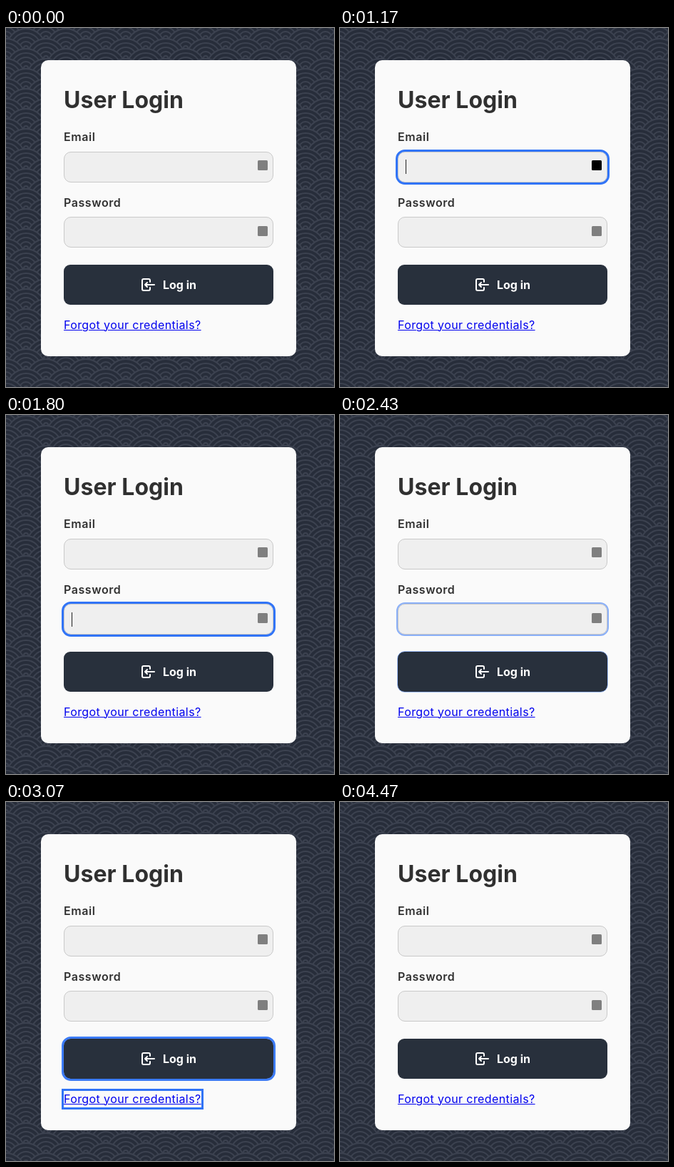
Write an HTML page that moves like this. It is 460 by 502 pixels and loops after 4.57 s.

```html
<!DOCTYPE html>
<html lang="en">
<head>
<meta charset="utf-8">
<title>User Login</title>
<style>
  html, body { margin: 0; width: 100%; height: 100%; overflow: hidden; background: #272d3a; }
  svg { display: block; width: 460px; height: 502px; }
  text, .link { font: 600 16px Inter, "Open Sans", sans-serif; fill: #303030; }
  .title { font-size: 32px; font-weight: 700; letter-spacing: .05px; }
  .label { letter-spacing: .55px; }
  .button { font-weight: 700; fill: #fff; }
  .link {
    position: absolute; left: 81px; top: 403px;
    font-weight: 400; line-height: 24px; letter-spacing: .4px; white-space: nowrap;
    color: #00e; text-decoration: underline 1px; text-underline-offset: 1px;
  }
  .wave { fill: #272d3a; stroke: #3c4250; stroke-width: 2; }
  .field { fill: #efefef; stroke: #c9c9c9; }
  .ring { fill: none; stroke: #3174f6; }
  .icon { fill: none; stroke: #fff; stroke-width: 2; stroke-linecap: round; stroke-linejoin: round; }
</style>
</head>
<body>
<svg viewBox="0 0 460 502">
  <defs>
    <pattern id="waves" width="56" height="28" patternUnits="userSpaceOnUse"></pattern>
  </defs>
  <rect width="460" height="502" fill="url(#waves)"/>
  <rect x="49" y="45" width="358" height="414" rx="10" fill="#fafafa"/>

  <text class="title" x="81" y="112">User Login</text>
  <text class="label" x="81" y="158">Email</text>
  <rect class="field" x="81.5" y="173.5" width="293" height="42" rx="9.5"/>
  <rect id="emailBadge" x="353" y="185" width="14" height="14" rx="1.5"/>
  <text class="label" x="81" y="250">Password</text>
  <rect class="field" x="81.5" y="264.5" width="293" height="42" rx="9.5"/>
  <rect x="353" y="277" width="14" height="14" rx="1.5" fill="#7f7f7f"/>
  <rect id="caret" x="92" width="1" height="20" fill="#222"/>

  <rect x="81" y="331" width="294" height="56" rx="9" fill="#28303c"/>
  <path class="icon" transform="translate(187 347)"
    d="M15 8v-2a2 2 0 0 0-2-2h-7a2 2 0 0 0-2 2v12a2 2 0 0 0 2 2h7a2 2 0 0 0 2-2v-2M21 12h-13l3-3m0 6l-3-3"/>
  <text class="button" x="220" y="365">Log in</text>
  <rect id="linkRing" class="ring" x="79.5" y="402.5" width="196" height="26" stroke-width="3"/>
</svg>
<span class="link">Forgot your credentials?</span>
<script>
const LOOP = 4570, FADE = 300, LEAD = 20, RING = 3;
const FOCUS = { email: 700, password: 1500, button: 2370, link: 3070, none: 4470 };
const HOLD = { from: 830, to: 1170 };
const byId = id => document.getElementById(id);

function setAll(el, attrs) {
  for (const key in attrs) el.setAttribute(key, attrs[key]);
}

function add(parent, name, attrs) {
  const el = document.createElementNS("http://www.w3.org/2000/svg", name);
  setAll(el, attrs);
  return parent.appendChild(el);
}

// Overlapping scales: each lower row covers the one above.
for (let row = -1; row < 4; row++) {
  for (let cx = row % 2 ? 0 : -28; cx <= 84; cx += 56) {
    for (const r of [27, 21, 15, 9, 3]) {
      add(byId("waves"), "circle", { class: "wave", cx, cy: row * 14, r });
    }
  }
}

// Same curve as the CSS "ease" keyword.
function ease(x) {
  const bezier = (a, b, s) => 3 * a * s * (1 - s) ** 2 + 3 * b * s * s * (1 - s) + s ** 3;
  let low = 0, high = 1;
  for (let i = 0; i < 20; i++) {
    const mid = (low + high) / 2;
    if (bezier(.25, .25, mid) < x) low = mid; else high = mid;
  }
  return bezier(.1, 1, low);
}

function progress(t, start) {
  return t < start ? 0 : ease(Math.min(1, (t - start + LEAD) / FADE));
}

const rings = [
  { y: 173, height: 43, start: FOCUS.email, end: FOCUS.password },
  { y: 264, height: 43, start: FOCUS.password, end: FOCUS.button },
  { y: 331, height: 56, start: FOCUS.button, end: FOCUS.link }
];
for (const ring of rings) {
  ring.el = add(document.querySelector("svg"), "rect", { class: "ring" });
}

function drawRing({ el, y, height, start, end }, t) {
  const leaving = t >= end;
  const amount = leaving ? 1 - progress(t, end) : progress(t, start);
  const width = leaving ? Math.ceil(RING * amount - .01) : Math.floor(RING * amount + .01);
  setAll(el, {
    x: 81 - width / 2, y: y - width / 2,
    width: 294 + width, height: height + width, rx: 10 + width / 2,
    "stroke-width": width, "stroke-opacity": width ? amount : 0
  });
}

function show(el, visible) {
  el.setAttribute("visibility", visible ? "visible" : "hidden");
}

function render(t) {
  const within = (from, to) => t >= from && t < to;
  // The first ring pauses part-way, then snaps to full width.
  const ringTime = within(HOLD.from, HOLD.to) ? HOLD.from : t;
  rings.forEach(ring => drawRing(ring, ringTime));

  byId("emailBadge").setAttribute("fill", within(HOLD.to, FOCUS.password) ? "#000" : "#7f7f7f");
  byId("caret").setAttribute("y", t < FOCUS.password ? 184 : 276);
  show(byId("caret"), within(FOCUS.email, FOCUS.button));
  show(byId("linkRing"), within(FOCUS.link, FOCUS.none));
}

const began = performance.now();
function tick() {
  render((performance.now() - began) % LOOP);
  requestAnimationFrame(tick);
}
tick();
</script>
</body>
</html>
```
